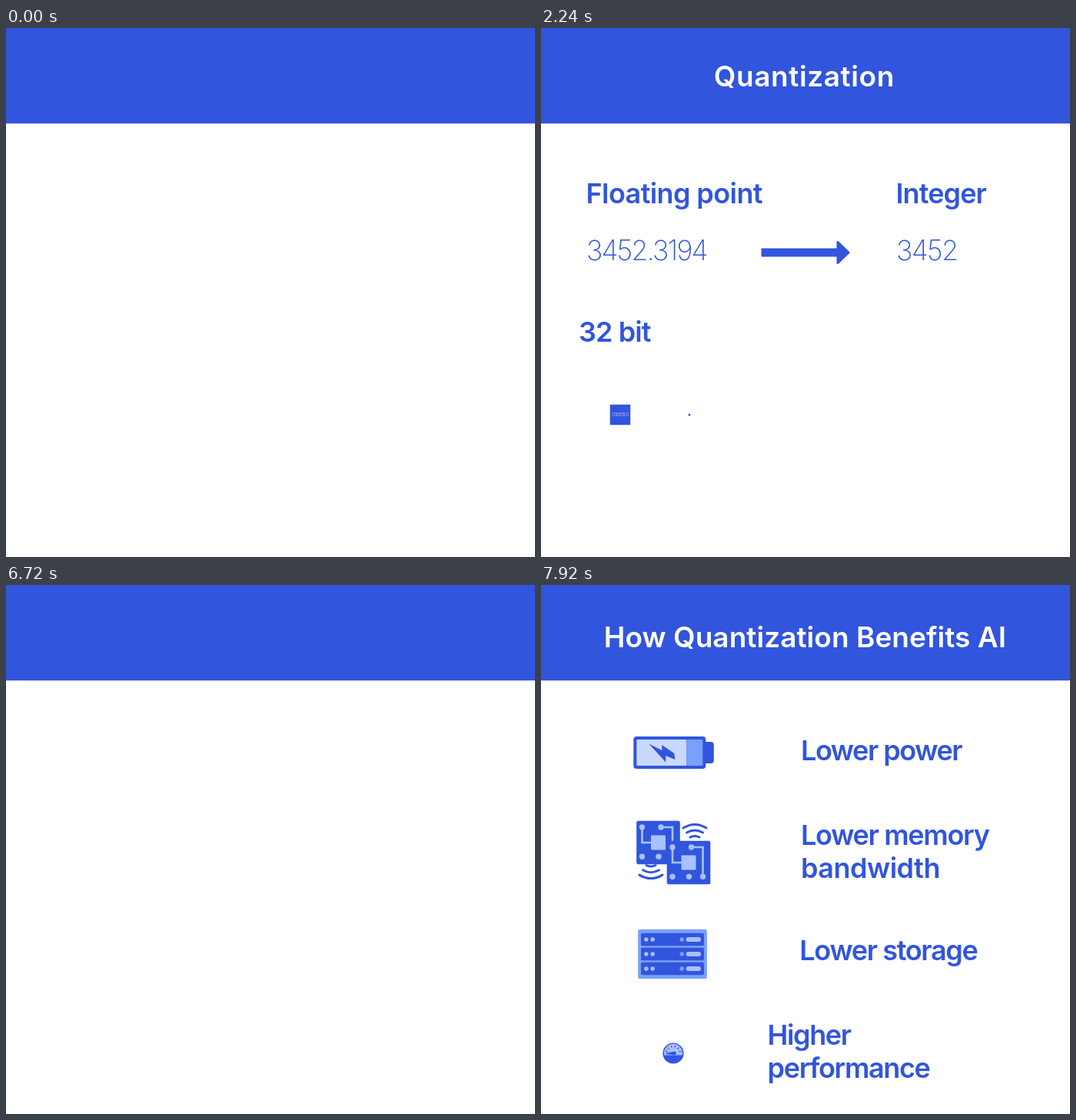
Write an HTML page that moves like this. It is 688x688 px and loops after 8 s.

```html
<!DOCTYPE html>
<html lang="en">
<head>
<meta charset="utf-8">
<title>Quantization</title>
<style>
html, body { margin: 0; width: 100%; height: 100%; overflow: hidden; background: #fff; }
svg { display: block; width: 100vw; height: 100vh; }
text { font: 600 36px Inter, "Open Sans", sans-serif; fill: #3155dd; }
.title { font-size: 37px; fill: #fff; text-anchor: middle; }
.thin { font-weight: 200; }
.bits { font-weight: 200; font-size: 21px; fill: #fff; text-anchor: middle; letter-spacing: -1.8px; }
</style>
</head>
<body>
<svg id="stage" viewBox="0 0 688 688">
  <rect width="688" height="124.2" fill="#3155dd"/>
</svg>
<script>
const LOOP = 8000, STEP = 80, CUT = 6720;
const BLUE = '#3155dd', MID = '#7ba0fb', SOFT = '#a9c1ff', PALE = '#c9d9fd';
const stage = document.getElementById('stage');
const parts = [];
const clamp = v => Math.min(1, Math.max(0, v));

// cubic-bezier(.25, 0, 0, 1)
function ease(p) {
  p = clamp(p);
  let lo = 0, hi = 1;
  for (let i = 0; i < 24; i++) {
    const m = (lo + hi) / 2;
    if (.75 * m * (1 - m) ** 2 + m ** 3 < p) lo = m; else hi = m;
  }
  return lo * lo * (3 - 2 * lo);
}

function add(start, markup, move = () => {}) {
  stage.insertAdjacentHTML('beforeend', `<g>${markup}</g>`);
  parts.push({ el: stage.lastElementChild, start, end: start < CUT ? CUT : LOOP, move });
}

const rect = (x, y, w, h, fill, r = 0) =>
  `<rect x="${x}" y="${y}" width="${w}" height="${h}" rx="${r}" fill="${fill}"/>`;
const dot = (x, y, r, fill) => `<circle cx="${x}" cy="${y}" r="${r}" fill="${fill}"/>`;
const line = (d, color, width) =>
  `<path d="${d}" fill="none" stroke="${color}" stroke-width="${width}" stroke-linecap="round"/>`;
const label = (x, y, str, spacing = 0, cls = '') =>
  `<text x="${x}" y="${y}" class="${cls}" style="letter-spacing:${spacing}px">${str}</text>`;

const fade = (start, markup) =>
  add(start, markup, (el, age) => el.setAttribute('opacity', clamp(age / 280)));

const slide = (start, markup) => add(start, markup, (el, age) => {
  el.setAttribute('transform', `translate(${-48 * (1 - ease(age / 620))} 0)`);
  el.setAttribute('opacity', clamp(age / 45));
});

const pop = (start, x, y, markup) => add(start, markup, (el, age) =>
  el.setAttribute('transform', `translate(${x} ${y}) scale(${ease(age / 620)})`));

function arrow(start, y) {
  const head = `<path d="M1 -13.5L15 0L1 13.5Z" fill="${BLUE}" stroke="${BLUE}" stroke-width="3" stroke-linejoin="round"/>`;
  add(start, rect(286.5, y - 5.5, 1, 11, BLUE) + head, (el, age) => {
    const len = 99 * ease(age / 800);
    el.firstChild.setAttribute('width', len + 1);
    el.lastChild.setAttribute('transform', `translate(${286 + len} ${y})`);
  });
}

const byte = (start, x, y) => pop(start, x, y,
  rect(-42.5, -42.5, 85, 85, BLUE) + '<text class="bits" x="-.9" y="7.5">01010101</text>');

// First scene
fade(40, label(342.3, 76, 'Quantization', .6, 'title'));
slide(240, label(58.5, 228, 'Floating point', -.6) + label(59, 302, '3452.3194', -1.8, 'thin'));
arrow(800, 292);
slide(810, label(461.5, 228, 'Integer', -.9) + label(462, 302, '3452', -1.6, 'thin'));
slide(1980, label(58, 408, '32 bit', -.9));
for (let i = 0; i < 4; i++) byte(2140 + 60 * i, 103 + 90 * (i % 2), 503 + 90 * (i >> 1));
arrow(3200, 548);
slide(3210, label(458, 408, '8 bit', -.9));
byte(3420, 506, 547);

// Second scene
const battery = rect(0, -14, 52.5, 28, BLUE, 4) +
  rect(-52, -21, 94, 42, BLUE, 4) + rect(-48, -17, 65, 34, PALE, 1) + rect(17, -17, 21, 34, MID, 1) +
  `<path d="M-32 -11.5L-15 -3V-10L1 1L2 9L-10 4V12.5Z" fill="${BLUE}"/>`;

const chip = rect(-28.3, -28.3, 56.6, 56.6, BLUE, 2.5) + rect(-9.5, -9.5, 19, 19, SOFT, 1) +
  line('M-21 -20V0H-9M3.5 -20H18.5V18', SOFT, 2.6) +
  [[-21, -20], [3.5, -20], [-21, 18.3], [.5, 18.3], [18.5, 18.3]]
    .map(([x, y]) => dot(x, y, 3.7, SOFT)).join('');

const server = rect(-46, -33, 92, 66, MID, 3) + [-19.5, 0, 19.5].map(y =>
  rect(-42, y - 8.5, 84, 17, BLUE, 2) + dot(-35, y, 2.8, SOFT) + dot(-26.5, y, 2.8, SOFT) +
  dot(12.5, y, 2.8, MID) + rect(18, y - 3, 20, 6, SOFT, 3)).join('');

const ticks = [15, 45, 75, 105, 135, 165].map(a => {
  const c = Math.cos(a * Math.PI / 180), s = -Math.sin(a * Math.PI / 180);
  return line(`M${25 * c} ${25 * s}L${31 * c} ${31 * s}`, BLUE, 3.5);
}).join('');
const gauge = dot(0, 0, 42, BLUE) + `<path d="M-36 8A37 37 0 1 1 36 8Z" fill="${SOFT}"/>` + ticks +
  `<path d="M-29 -1L4 -7V7L-29 3Z" fill="${BLUE}"/>` + dot(5, 0, 7, BLUE);

const wave = (x, y, half, bend) => line(`M${x - half} ${y}Q${x} ${y + bend} ${x + half} ${y}`, BLUE, 3);

fade(6720, label(343.5, 81, 'How Quantization Benefits AI', .05, 'title'));
pop(6720, 172.3, 218, battery);
slide(6722, label(338, 228, 'Lower power', -1.45));
pop(7080, 152.5, 335, chip);
pop(7165, 192, 361, chip);
slide(7100, label(338, 338, 'Lower memory', -1.3) + label(338, 381, 'bandwidth', -.5));
for (let i = 0; i < 3; i++) {
  const half = 6 + 4.5 * i, bend = 3 + 3 * i;
  add(7600 + 80 * i,
    wave(200, 328 - 6 * i, half, -bend) + wave(143, 364.5 + 6.3 * i, half, bend));
}
pop(7454, 171, 480, server);
slide(7479, label(338, 488, 'Lower storage', -1.35));
pop(7818, 172, 609, gauge);
slide(7855, label(337.5, 598, 'Higher', -1.4) + label(337.5, 641, 'performance', -1.35));

function draw() {
  const t = Math.floor(performance.now() % LOOP / STEP) * STEP;
  for (const { el, start, end, move } of parts) {
    const on = t > start && t < end;
    el.style.display = on ? '' : 'none';
    if (on) move(el, t - start);
  }
  requestAnimationFrame(draw);
}
draw();
</script>
</body>
</html>
```
